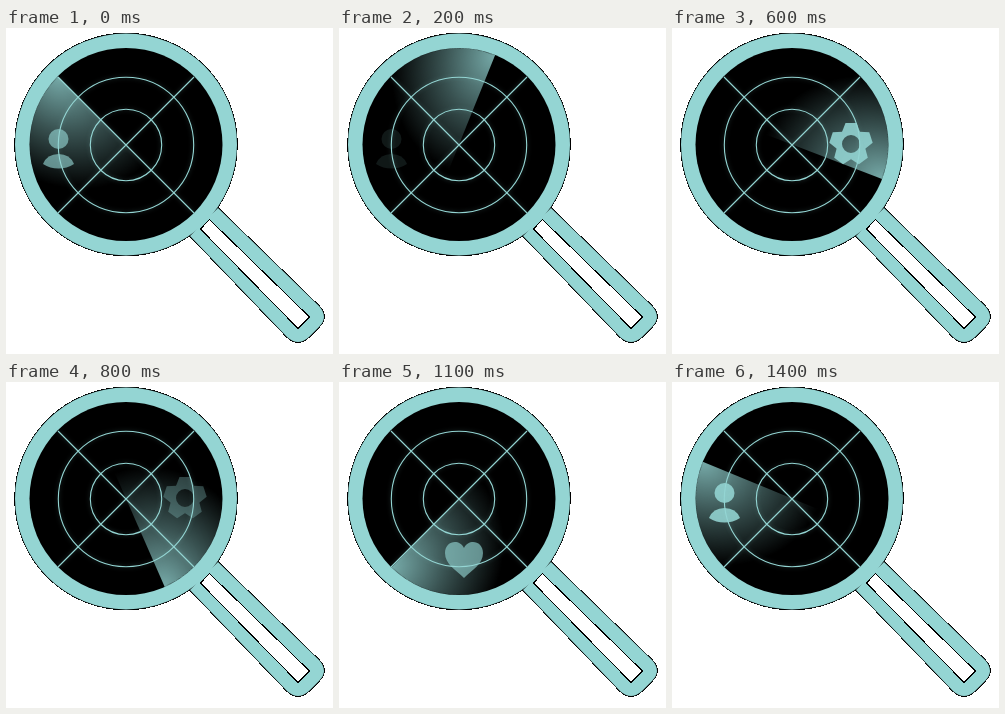
An HTML page for the animation above (1500 ms loop, 327 px wide and 326 px high).

```html
<!DOCTYPE html>
<html lang="en">
<head>
<meta charset="utf-8">
<title>Radar magnifier</title>
<style>
  html, body { margin: 0; width: 100%; height: 100%; overflow: hidden; background: #fff; }
  svg { display: block; width: 327px; height: 326px; }
  .teal { fill: #94d5d3; }
  .rim { fill: none; stroke: #000; stroke-width: 1.6; shape-rendering: crispEdges; }
  .thin { stroke-width: 1; }
  .grid { fill: none; stroke: #94d5d3; stroke-width: 1.1; filter: drop-shadow(0 0 2px #94d5d350); }
  .sweep { transform-origin: 120px 116.5px; animation: sweep 1.5s infinite; }
  .icon { fill: #94d5d3; animation: blip 1.5s step-end infinite; }
  .gear { animation-delay: -1s; }
  .heart { animation-delay: -.6s; }
  .user { animation-delay: -.2s; }

  @keyframes sweep {
    0% { transform: rotate(-45deg); animation-timing-function: step-end; }
    6.6666% { transform: rotate(-1.5deg); animation-timing-function: steps(3, end); }
    26.6666% { transform: rotate(69deg); animation-timing-function: steps(2, end); }
    40% { transform: rotate(111deg); animation-timing-function: steps(9, end); }
    100% { transform: rotate(315deg); }
  }
  @keyframes blip {
    0% { opacity: .6; }
    6.666% { opacity: .88; }
    13.333% { opacity: .63; }
    20% { opacity: .3; }
    26.666% { opacity: .11; }
    33.333%, 100% { opacity: 0; }
  }
</style>
</head>
<body>
<svg viewBox="0 0 327 326">
  <defs>
    <radialGradient id="beam" gradientUnits="userSpaceOnUse" cx="0" cy="0" r="1"
                    gradientTransform="translate(120 20) scale(100 124)">
      <stop offset="0" stop-color="#94d5d3" stop-opacity=".8"/>
      <stop offset=".5" stop-color="#94d5d3" stop-opacity=".38"/>
      <stop offset="1" stop-color="#94d5d3" stop-opacity="0"/>
    </radialGradient>
    <path id="handle" d="M212 180 L313 278 Q323 289 313 299 L303 309 Q292 319 281 309 L184 208"/>
    <path id="slot" d="M203.5 191.5 L303.5 289 L292 300.5 L194.5 201 Z"/>
    <path id="tooth" d="M170 104 L173.5 95 H184.5 L188 104 Z"/>
  </defs>

  <use href="#handle" class="rim"/>
  <circle class="rim" cx="120" cy="116.5" r="111"/>
  <use href="#handle" class="teal"/>
  <circle class="teal" cx="120" cy="116.5" r="111"/>
  <use href="#slot" fill="#fff"/>
  <use href="#slot" class="rim thin"/>
  <circle cx="120" cy="116.5" r="96.5"/>

  <path class="sweep" fill="url(#beam)" d="M120 20 A96.5 96.5 0 0 0 120 213 Z"/>

  <g class="icon user">
    <circle cx="52.5" cy="111" r="10"/>
    <path d="M37 136 Q41 126 52.5 126 Q64 126 68 136 Q61 140.5 52.5 140.5 Q44 140.5 37 136 Z"/>
  </g>
  <g class="icon gear">
    <path fill-rule="evenodd" d="M164 116 a15 15 0 1 0 30 0 a15 15 0 1 0 -30 0 M170 116 a9 9 0 1 0 18 0 a9 9 0 1 0 -18 0"/>
    <use href="#tooth"/>
    <use href="#tooth" transform="rotate(72 179 116)"/>
    <use href="#tooth" transform="rotate(144 179 116)"/>
    <use href="#tooth" transform="rotate(216 179 116)"/>
    <use href="#tooth" transform="rotate(288 179 116)"/>
  </g>
  <path class="icon heart" d="M125 196 C117 188 106 182 106 171 C106 159 120 156 125 166 C130 156 144 159 144 171 C144 182 133 188 125 196 Z"/>

  <g class="grid">
    <circle cx="120" cy="117" r="67.7"/>
    <circle cx="120" cy="117" r="35.7"/>
    <path d="M52 49 L188 185 M188 49 L52 185"/>
  </g>
</svg>
</body>
</html>
```
